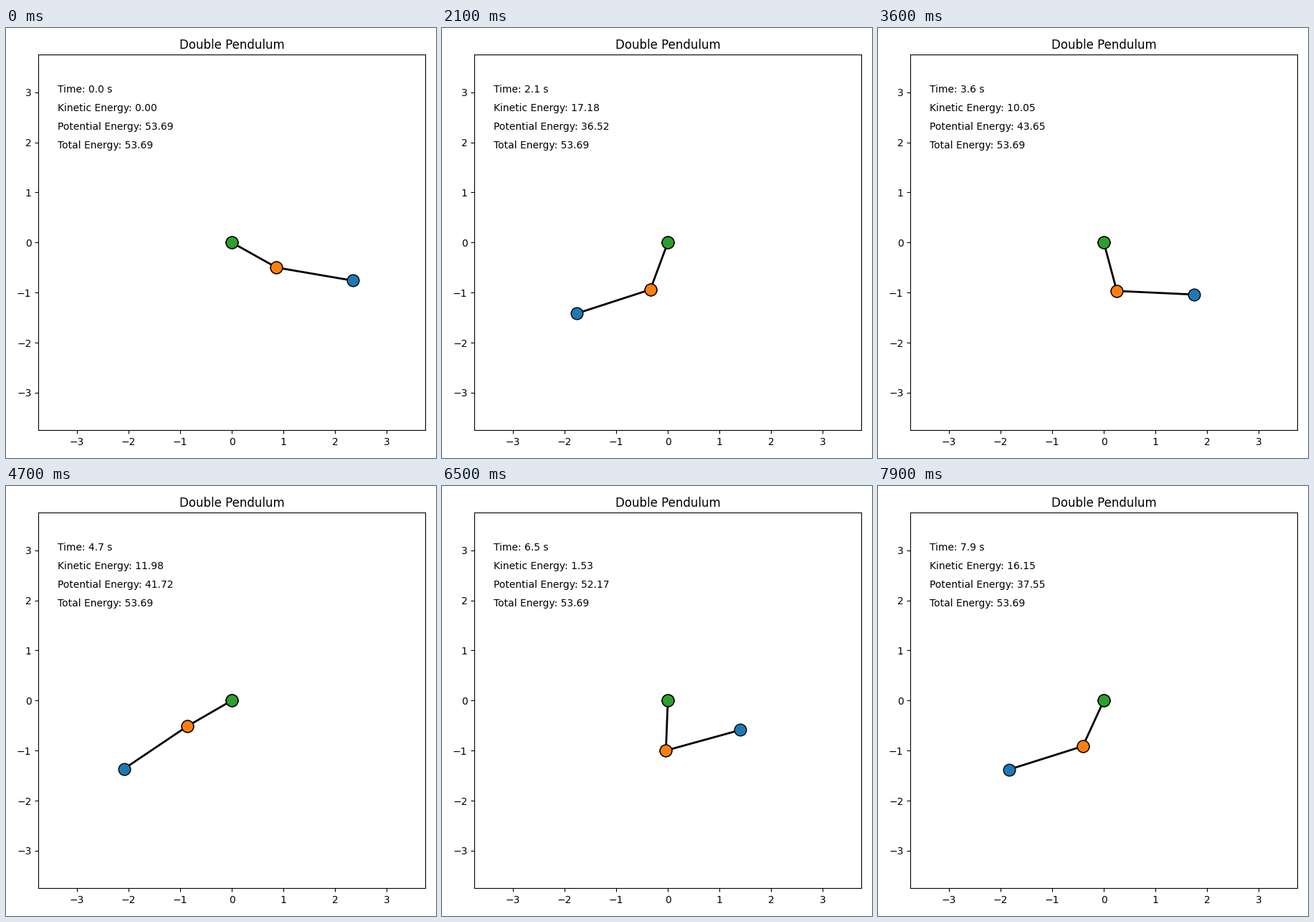
A matplotlib script that plays this animation: 600x600 px, repeating every 8 s.

```python
import numpy as np
import matplotlib.pyplot as plt
from matplotlib.animation import FuncAnimation

G = 9.8
M1, M2 = 1.0, 2.0
L1, L2 = 1.0, 1.5
FRAMES, INTERVAL = 80, 100
SUBSTEPS = 50


def derivative(state):
    """Time derivative of (theta1, theta2, omega1, omega2)."""
    t1, t2, w1, w2 = state
    s, c = np.sin(t2 - t1), np.cos(t2 - t1)
    s1, s2 = np.sin(t1), np.sin(t2)
    m = M1 + M2
    den = m - M2 * c * c
    a1 = (M2 * (L1 * w1**2 * s * c + G * s2 * c + L2 * w2**2 * s)
          - m * G * s1) / (L1 * den)
    a2 = (m * (G * s1 * c - L1 * w1**2 * s - G * s2)
          - M2 * L2 * w2**2 * s * c) / (L2 * den)
    return np.array([w1, w2, a1, a2])


def rk4_step(y, h):
    k1 = derivative(y)
    k2 = derivative(y + h / 2 * k1)
    k3 = derivative(y + h / 2 * k2)
    k4 = derivative(y + h * k3)
    return y + h / 6 * (k1 + 2 * k2 + 2 * k3 + k4)


def simulate():
    y = np.array([np.radians(60), np.radians(80), 0.0, 0.0])
    h = INTERVAL / 1000 / SUBSTEPS
    states = [y]
    for _ in range(FRAMES - 1):
        for _ in range(SUBSTEPS):
            y = rk4_step(y, h)
        states.append(y)
    return states


def joints(state):
    """Positions of the outer mass, the inner mass and the pivot."""
    t1, t2 = state[:2]
    x1, y1 = L1 * np.sin(t1), -L1 * np.cos(t1)
    return [x1 + L2 * np.sin(t2), x1, 0], [y1 - L2 * np.cos(t2), y1, 0]


def energies(state):
    t1, t2, w1, w2 = state
    v1, v2 = L1 * w1, L2 * w2
    kinetic = (M1 * v1**2 + M2 * (v1**2 + v2**2
               + 2 * v1 * v2 * np.cos(t1 - t2))) / 2
    _, (y2, y1, _) = joints(state)
    base = L1 + L2
    potential = G * (M1 * (base + y1) + M2 * (base + y2))
    return kinetic, potential


states = simulate()

plt.rcParams["font.family"] = "DejaVu Sans"
fig, ax = plt.subplots(figsize=(6, 6), dpi=100)
reach = 1.5 * (L1 + L2)
ax.set(xlim=(-reach, reach), ylim=(-reach, reach), title="Double Pendulum")
fig.tight_layout()

rod, = ax.plot([], [], "k-", lw=2)
bobs = [ax.plot([], [], "o", ms=12, mfc=color, mec="black")[0]
        for color in ("C0", "C1", "C2")]
labels = [ax.text(0.05, y, "", transform=ax.transAxes)
          for y in (0.9, 0.85, 0.8, 0.75)]


def update(i):
    xs, ys = joints(states[i])
    rod.set_data(xs, ys)
    for k, bob in enumerate(bobs):
        bob.set_data(xs[k:], ys[k:])
    kinetic, potential = energies(states[i])
    lines = (
        f"Time: {i * INTERVAL / 1000:.1f} s",
        f"Kinetic Energy: {kinetic:.2f}",
        f"Potential Energy: {potential:.2f}",
        f"Total Energy: {kinetic + potential:.2f}",
    )
    for label, line in zip(labels, lines):
        label.set_text(line)
    return [rod, *bobs, *labels]


anim = FuncAnimation(fig, update, frames=FRAMES, interval=INTERVAL,
                     init_func=lambda: update(0), repeat=True, repeat_delay=0)
plt.show()
```
